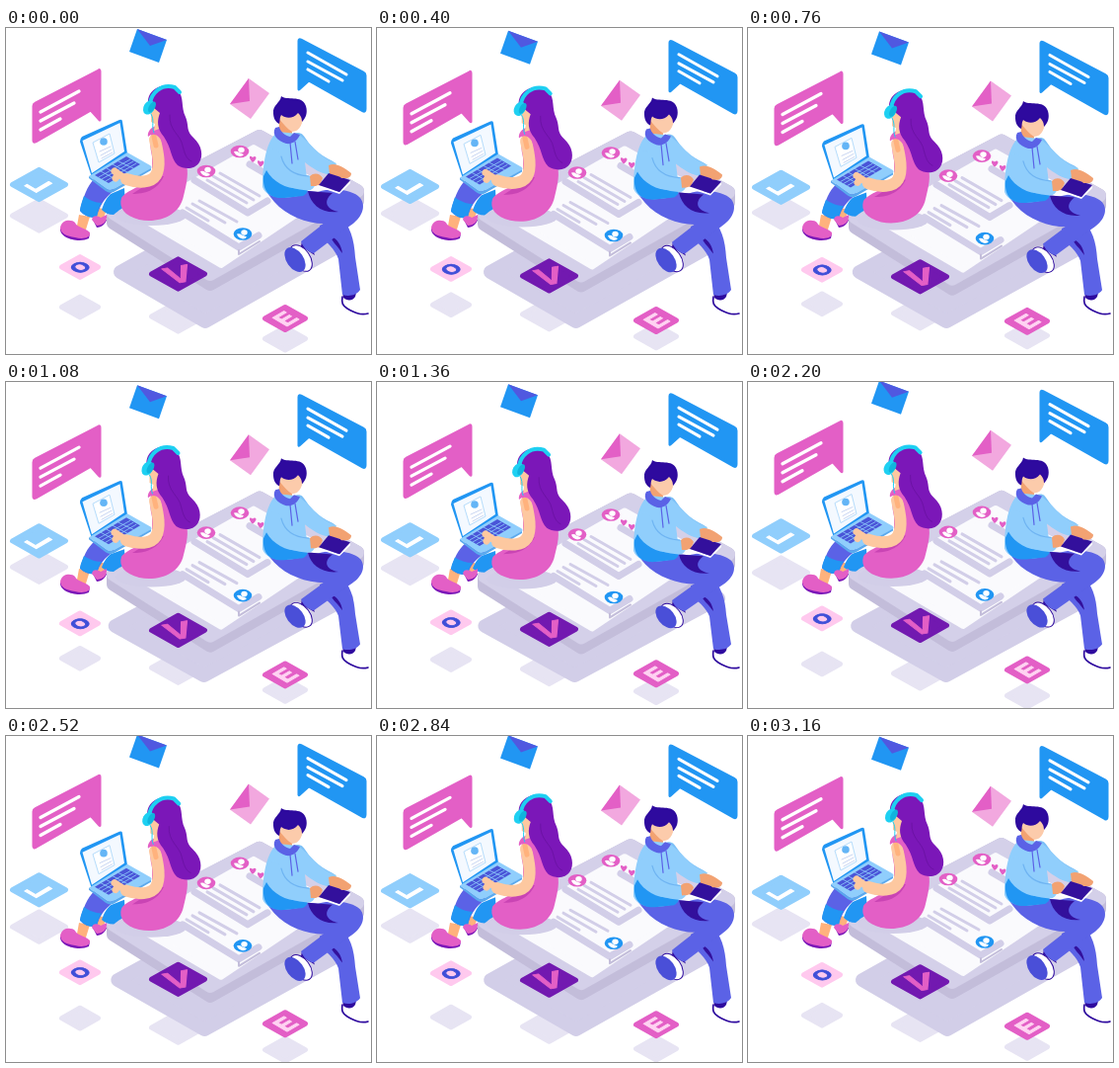
Write an HTML page that moves like this. It is 370 px wide and 330 px high and loops after 3200 ms.

```html
<!DOCTYPE html>
<html lang="en">
<head>
<meta charset="utf-8">
<title>Chatting people</title>
<style>
html, body { margin: 0; width: 100%; height: 100%; overflow: hidden; background: #fff; }
svg { display: block; }
text { font: bold 28px "Liberation Sans", Arial, sans-serif; text-anchor: middle; stroke-linejoin: round; }
.line { fill: none; stroke-linecap: round; stroke-linejoin: round; }
.round { stroke-linejoin: round; }
</style>
</head>
<body>
<svg width="370" height="330" viewBox="0 0 370 330">
  <g id="shades"></g>

  <path id="shadow" class="round" fill="#d2cee8" stroke="#d2cee8" stroke-width="14"
    d="M116 247L250 172L340 219L202 297Z"/>

  <!-- phone -->
  <g data-drop="1">
    <path class="round" fill="#c3bdda" stroke="#c3bdda" stroke-width="14" d="M109 187V197L207 259L356 175V165L257 110Z"/>
    <path class="round" fill="#d4d0e9" stroke="#d4d0e9" stroke-width="14" d="M109 187L257 110L356 165L207 249Z"/>
    <path class="round" fill="#fafafd" stroke="#fafafd" stroke-width="6" d="M131 189L251 121L330 165L218 240Z"/>
    <ellipse cx="147" cy="190" rx="36" ry="10" fill="#d2cee8"/>
    <g class="line" stroke="#d2cee8" stroke-width="7">
      <path d="M191 154L245 187L265 175M179 187L236 222L256 210M247 138L266 149"/>
      <path stroke="#c3bdda" stroke-width="2" d="M236 225V229L257 216"/>
      <path stroke-width="3" d="M198 158L236 180M204 154L244 177M210 150L251 174M217 147L257 170M183 182L205 195M189 178L222 197M196 175L234 196"/>
    </g>
    <g id="avatars"></g>
    <g fill="#e35fc6">
      <path id="heart" d="M250 136C245 131 247 128 250 131C253 128 256 132 250 136Z"/>
      <use href="#heart" x="8" y="4.5"/>
    </g>
  </g>

  <g id="tiles"></g>

  <!-- woman: feet stay, legs and seat fold, the rest follows the phone -->
  <path fill="#ffb27d" d="M74 189L85 191L81 204L71 206ZM94 182L102 184L98 195L91 194Z"/>
  <g data-foot="208" data-hip="160">
    <path fill="#2196f3" d="M106 168L120 162L121 181C114 184 112 187 109 189C104 189 100 187 97 184C99 178 101 173 106 168Z"/>
    <path fill="#5b62e6" d="M90 152C82 160 78 172 75 185C80 191 87 193 92 191C95 180 99 173 110 164L105 151Z"/>
    <path fill="#2196f3" d="M79 170C77 176 75 181 75 185C80 191 87 193 92 191C93 186 94 182 97 177C90 177 84 174 79 170Z"/>
  </g>
  <g fill="#e35fc6">
    <path fill="#7b17b8" d="M55 203C54 213 74 218 84 213L85 208ZM88 194L92 202C97 202 101 198 102 194Z"/>
    <path d="M55 202C57 193 67 194 70 197C72 202 80 202 85 207C86 213 77 214 70 212C62 211 55 208 55 202ZM87 194C88 189 93 190 96 192L102 189C103 196 98 200 92 200Z"/>
  </g>
  <g data-foot="300" data-hip="100">
    <path fill="#e35fc6" d="M155 98C147 102 144 112 148 130V150C140 160 122 164 117 172C114 182 120 190 135 194C155 198 176 190 180 170C183 158 186 145 182 137C176 126 170 112 160 102Z"/>
    <path fill="#c944b4" d="M148 152C140 161 134 164 128 168C140 168 153 165 160 150Z"/>
  </g>
  <g data-drop=".95">
    <g id="laptop">
      <path fill="#2196f3" d="M75 115Q75 112 77 110L115 93Q118 92 118 95L123 127L87 151Z"/>
      <path fill="#f4f9ff" d="M77.5 114L115.5 96L120 125L87 147Z"/>
      <path fill="#fff" stroke="#b5dcfb" d="M88 116L105 107L110 127L94 136Z"/>
      <circle cx="99" cy="115" r="3.8" fill="#64b5f6"/>
      <path class="line" stroke="#c9d6f2" d="M95 125L106 120M96 129L107 123M97 132L108 126"/>
      <path fill="#90cefc" d="M84 150L123 126L146 139Q149 141 146 143L109 163Q105 165 102 163Z"/>
      <path fill="#5aa9ee" d="M84 150L102 163Q105 165 109 163L147 142V144L109 166Q105 168 101 165L84 152Z"/>
      <path fill="#4a55d8" d="M90 149L122 130L136 138L104 157Z"/>
      <path class="line" stroke="#90cefc" stroke-width=".8" d="M94 151L126 133M97 153L129 135M101 155L132 137M96 145L111 153M102 142L117 150M108 138L123 146M114 135L129 142"/>
    </g>
    <path class="line" stroke="#fdc8a0" stroke-width="12" d="M151 113C154 126 157 140 152 149C147 157 134 157 122 153"/>
    <path class="line" stroke="#fdc8a0" stroke-width="7" d="M128 155C121 153 116 149 110 145M113 149L111 152"/>
    <path class="line" stroke="#ffb27d" stroke-width="5" d="M150 110L152 119"/>
    <path fill="#e35fc6" d="M155 98C146 100 143 106 144 110C150 105 157 109 159 119L166 112Z"/>
  </g>
  <g data-drop=".92" data-lean="-.2">
    <path fill="#fdc8a0" d="M147 80L158 80V101L150 104L151 97L147 95Z"/>
    <path fill="#7b17b8" d="M144 76C143 60 164 53 174 63C181 70 177 80 182 90C186 100 182 103 190 111C199 119 200 130 196 136C191 144 180 143 174 139C167 132 168 122 160 110C153 102 153 94 156 86Z"/>
    <path class="line" stroke="#6c12a5" d="M166 88C165 104 177 108 179 119C181 127 183 133 188 135"/>
    <path class="line" stroke="#1ed0f2" stroke-width="4" d="M146 77C147 66 157 56 171 60L176 65"/>
    <ellipse cx="145" cy="80.5" rx="5.5" ry="7.5" fill="#1ed0f2" transform="rotate(30 145 80.5)"/>
    <ellipse cx="148" cy="80" rx="3" ry="6" fill="#10b4dd" transform="rotate(30 148 80)"/>
    <path class="line" stroke="#1ed0f2" d="M147 87C151 94 147 99 150 106"/>
  </g>

  <!-- man: the same, with crossed legs -->
  <path fill="#fff" d="M341 274L354 268L366 285L367 290L343 283Z"/>
  <path class="line" stroke="#2e0a9e" stroke-width="1.7" d="M341 272C340 278 341 281 346 284C353 288 359 291 367 289"/>
  <path fill="#2e0a9e" d="M341 266L356 264L354 272C351 277 345 276 342 273Z"/>
  <g data-foot="272" data-hip="165">
    <path fill="#5b62e6" d="M318 200L338 190C349 200 353 214 354 232L359 265C355 271 347 272 341 270L337 234C334 224 324 216 318 210Z"/>
    <path fill="#33109c" d="M330 211C340 207 346 202 350 196L340 188L324 205L333 218C337 222 339 226 341 228C340 220 336 214 330 211Z"/>
    <ellipse cx="299" cy="233" rx="9" ry="15" fill="#fff" stroke="#2e0a9e" transform="rotate(-35 299 233)"/>
    <ellipse cx="293" cy="234.5" rx="8.5" ry="14" fill="#4a4fd8" transform="rotate(-35 293 234.5)"/>
    <path fill="#2e0a9e" d="M300 216L311 225L313 230L299 221Z"/>
    <path fill="#5b62e6" d="M264 166C280 162 300 164 316 166C332 161 352 164 359 172C366 181 360 193 349 200L312 228C306 227 301 222 299 216L322 198C305 198 284 190 272 176Z"/>
    <path fill="#33109c" d="M306 165L331 167C320 176 326 184 337 186C320 188 309 179 306 165Z"/>
  </g>
  <g data-drop="1.07">
    <path class="line" stroke="#7cc0f7" stroke-width="14" d="M296 113C303 124 311 133 328 141"/>
    <path fill="#fccbab" d="M276 84L301 84C302 96 298 105 290 105L289 112L277 106Z"/>
    <path fill="#f2a272" d="M277 92C281 97 285 102 290 105L289 112L277 106Z"/>
    <path fill="#90cefc" d="M276 105C264 112 260 138 260 161C264 171 276 173 290 171C301 170 306 167 306 160L303 136C316 146 322 148 328 148L335 137C315 130 307 113 295 107Z"/>
    <path fill="#2196f3" d="M261 150C260 164 266 173 282 172L301 170C305 168 306 165 306 162C288 165 272 158 264 144Z"/>
    <path fill="#5b62e6" d="M273 101C269 108 275 114 284 117C291 118 296 113 298 108L292 106L288 110C283 109 278 105 277 100Z"/>
    <path class="line" stroke="#5b62e6" stroke-width="1.2" d="M288 116L290 137M293 115L296 133"/>
    <path class="line" stroke="#90cefc" stroke-width="15" d="M271 130C274 147 287 156 306 157"/>
    <path class="line" stroke="#6fb4f2" stroke-width="1.2" d="M279 130C282 142 290 149 307 150"/>
    <path fill="#f2a272" d="M327 139C334 136 341 140 350 147C350 152 345 153 340 151L328 148ZM308 150C313 145 319 148 321 152L318 159L309 160Z"/>
    <path fill="#fff" d="M317 159L338 166L349 155V157L338 168L317 161Z"/>
    <path fill="#33109c" d="M317 159L327 147L349 154L338 166Z"/>
    <path fill="#f2a272" d="M309 153L318 151C322 153 318 158 314 160L309 160ZM331 142L343 146L346 152L340 152Z"/>
    <path fill="#2e0a9e" d="M271 86C270 78 278 76 279 69C284 74 300 67 304 79C306 86 304 91 300 95C300 90 298 88 296 86C291 92 284 92 279 88C277 91 278 94 277 97C273 95 271 91 271 86Z"/>
  </g>

  <!-- bubbles and letters -->
  <g data-float="1">
    <path class="round" fill="#e35fc6" stroke="#e35fc6" stroke-width="3" d="M28 79Q28 77 30 76L94 43Q95 42 95 44V93L86 83L30 115Q28 116 28 114Z"/>
    <path class="line" stroke="#fff" stroke-width="3.3" d="M35 85L74 64M35 94L69 76M35 103L55 92"/>
    <path class="round" fill="#2196f3" stroke="#2196f3" stroke-width="3" d="M297 13Q297 11 299 12L362 45Q364 46 364 48V82Q364 85 362 84L307 53L297 62Z"/>
    <path class="line" stroke="#fff" stroke-width="3.1" d="M306 25L345 47M306 34L341 53M306 42L327 54"/>
    <path fill="#2196f3" d="M133 1L163 12L155 35L125 24Z"/>
    <path fill="#5058e0" d="M133 1L163 12L146 18Z"/>
    <path fill="#f2a8df" d="M246 51L267 66L248 92L227 77Z"/>
    <path fill="#e35fc6" d="M246 51L227 77L247 74Z"/>
  </g>
</svg>
<script>
const $ = id => document.getElementById(id);
const all = name => document.querySelectorAll(`[data-${name}]`);

const diamond = (x, y, w, color) => {
  const a = w - 4, b = a * .56;
  return `<path class="round" fill="${color}" stroke="${color}" stroke-width="5"
    d="M${x - a} ${y}L${x} ${y - b}L${x + a} ${y}L${x} ${y + b}Z"/>`;
};

// letter, x, y, half width, shade y, tile colour, letter colour, letter size, turn on the tile
const tiles = [
  ["L", 33.5, 158.5, 31, 190, "#90cefc", "#fff", 27, "rotate(90) scale(-1 1)"],
  ["O", 75, 242, 22.5, 282.5, "#ffc9ee", "#3f4fd8", 20, ""],
  ["V", 174.5, 249, 31, 292, "#7219b0", "#e35fc6", 34, "rotate(28)"],
  ["E", 283, 294, 24.5, 314.5, "#e35fc6", "#ffd3f2", 25, ""],
];
$("shades").innerHTML = tiles.map(([, x, , w, y]) => diamond(x, y, w, "#e7e4f3")).join("");
$("tiles").innerHTML = tiles.map(([ch, x, y, w, , back, ink, size, turn]) => diamond(x, y, w, back) +
  `<text transform="matrix(.86 -.5 .86 .5 ${x} ${y}) ${turn}" y="${size * .36}" fill="${ink}"
    stroke="${ink}" style="font-size:${size}px">${ch}</text>`).join("");

$("avatars").innerHTML = [[237, 125, "#e35fc6"], [203, 145, "#e35fc6"], [240, 208.5, "#2196f3"]]
  .map(([x, y, color]) => `<g transform="translate(${x} ${y})">
    <ellipse rx="9.3" ry="6.3" fill="${color}"/>
    <ellipse cx="1.5" cy="-1.5" rx="3.2" ry="2.8" fill="#fff"/>
    <path fill="#fff" d="M-6 0Q-3 -1 -1 1Q2 2 4 3Q3 5 0 5Q-5 4 -6 0Z"/></g>`).join("");

const LOOP = 3200, STEP = 40;
const move = (el, x, y) => el.setAttribute("transform", `translate(${x} ${y})`);

function draw(now) {
  const angle = Math.floor(now % LOOP / STEP) * STEP / LOOP * 2 * Math.PI;
  const drop = 5 * (1 - Math.cos(angle));
  const sway = Math.sin(angle);
  for (const el of all("drop")) move(el, drop * (el.dataset.lean || 0), drop * el.dataset.drop);
  for (const el of all("foot")) {
    const { foot, hip } = el.dataset;
    const k = 1 - drop / (foot - hip);
    el.setAttribute("transform", `matrix(1 0 0 ${k} 0 ${foot * (1 - k)})`);
  }
  for (const el of all("float")) move(el, 0, 2.5 * sway);
  move($("tiles"), 0, 2.8 * sway);
  move($("shades"), 0, -3.2 * sway);
  const grow = 1 + .0057 * drop;
  $("shadow").setAttribute("transform", `matrix(${grow} 0 0 1 ${232 * (1 - grow)} 0)`);
}

const start = performance.now();
(function tick() {
  draw(performance.now() - start);
  requestAnimationFrame(tick);
})();
</script>
</body>
</html>
```
